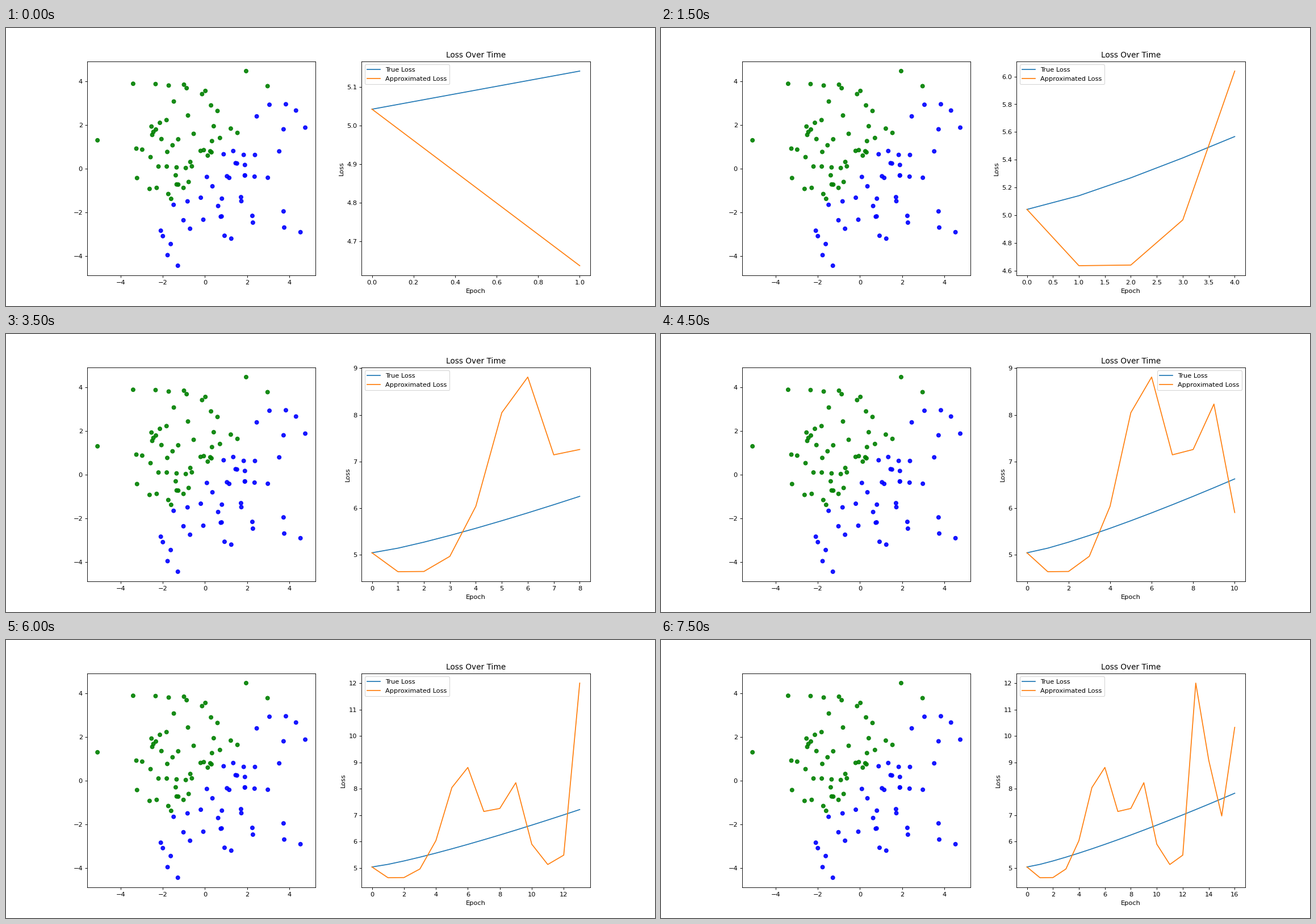
A matplotlib script that plays this animation: 1143 px wide and 490 px high, repeating every 8000 ms.

```python
import numpy as np
import matplotlib.pyplot as plt
from matplotlib.animation import FuncAnimation

EPOCHS = 16
DPI = 1143 / 14

# Spikes of the estimate: centre, height, width
SPIKES = [(0, 0.482, 0.665), (5.7, 4.34, 1.59), (8.8, 3.417, 1.026),
          (13.35, 9.424, 0.67), (16, 4.743, 0.896)]


def true_loss(epoch):
    return 5.0425 + 0.0988 * epoch ** 1.205


def approx_loss(epoch):
    loss = 4.56 + 0.004 * epoch ** 2
    for centre, height, width in SPIKES:
        loss = loss + height * np.exp(-(np.abs(epoch - centre) / width) ** 1.7)
    return loss


plt.rcParams["font.family"] = "DejaVu Sans"
fig, (ax_data, ax_loss) = plt.subplots(1, 2, figsize=(14, 6.002), dpi=DPI,
                                       gridspec_kw={"wspace": 0.201})

# Two classes split by the diagonal y = x
np.random.seed(0)
points = 2 * np.random.randn(100, 2)
colors = np.where(points[:, 1] > points[:, 0], "green", "blue")
ax_data.scatter(points[:, 0], points[:, 1], c=colors, alpha=0.9)


def update(frame):
    epochs = np.arange(frame + 2)
    ax_loss.clear()
    ax_loss.plot(epochs, true_loss(epochs), label="True Loss")
    ax_loss.plot(epochs, approx_loss(epochs), label="Approximated Loss")
    ax_loss.set_title("Loss Over Time")
    ax_loss.set_xlabel("Epoch")
    ax_loss.set_ylabel("Loss")
    ax_loss.legend(loc="best")
    return ax_loss.get_children()


anim = FuncAnimation(fig, update, frames=EPOCHS, init_func=lambda: update(0),
                     interval=500, repeat=True, repeat_delay=0)
plt.show()
```
